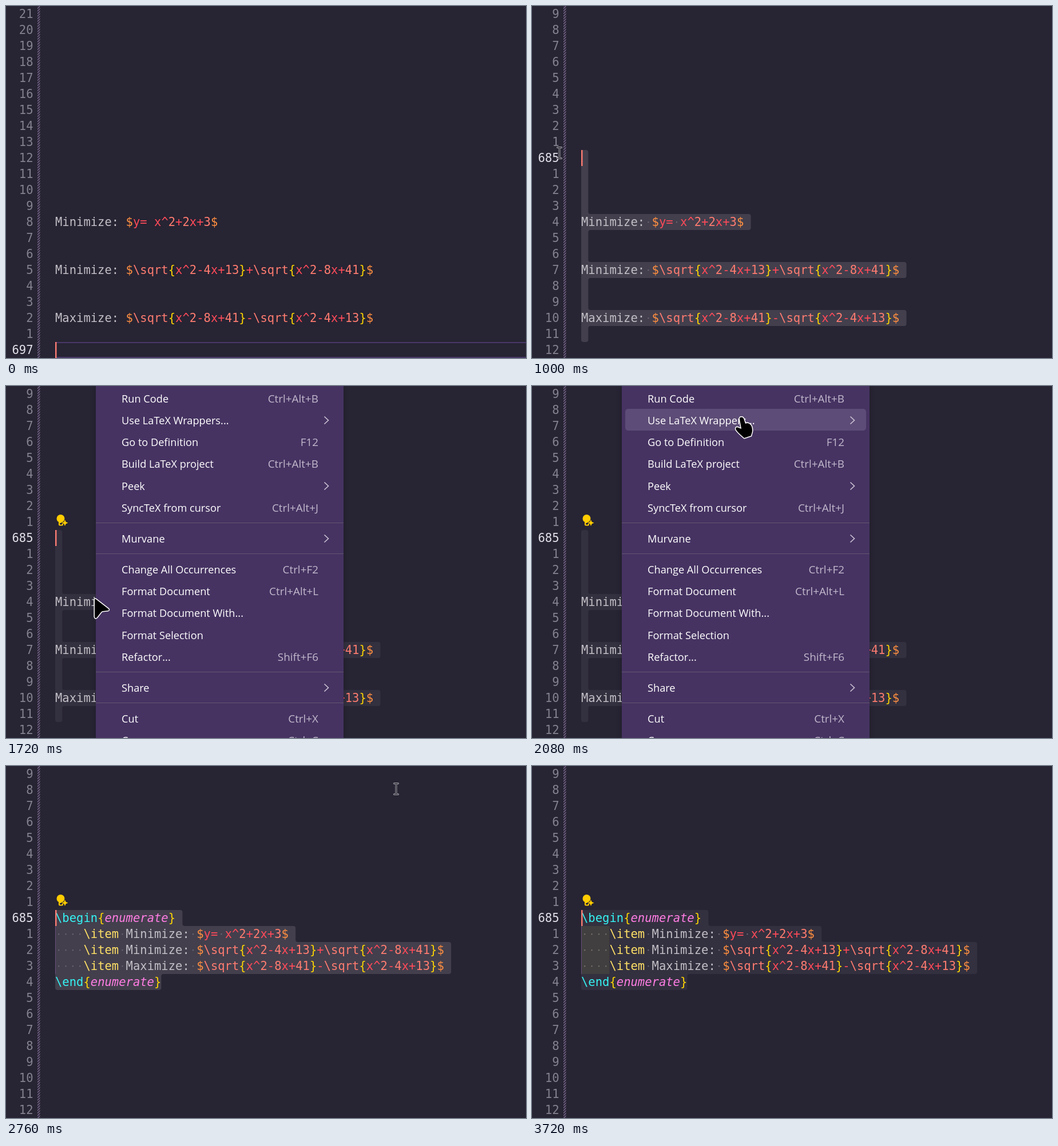
An HTML page with a canvas that plays this animation: 909x616 px, repeating every 3800 ms.

```html
<!DOCTYPE html>
<html lang="en">
<head>
<meta charset="utf-8">
<title>Wrapping lines in a list</title>
<style>
html, body { margin: 0; width: 100%; height: 100%; overflow: hidden; background: #272433; }
canvas { display: block; width: 909px; height: 616px; }
</style>
</head>
<body>
<canvas id="stage" width="909" height="616"></canvas>
<script>
const ctx = document.getElementById('stage').getContext('2d');
const W = 909, H = 616, LOOP = 3800, STEP = 40;
const ROW = 28, CHAR = 12.36, LEFT = 86;
const MONO = '20.53px "DejaVu Sans Mono", "Noto Sans Mono", monospace';
const UI = '18.2px "Open Sans", "Noto Sans", sans-serif';
const KEYS = '18.9px "Open Sans", "Noto Sans", sans-serif';
const MENU_AT = 1520, SUB_AT = 2320, WRAP_AT = 2760, SHADE_AT = 2880, BLUR_AT = 3720;

const sum = '$y= x^2+2x+3$';
const near = '\\sqrt{x^2-4x+13}', far = '\\sqrt{x^2-8x+41}';
const tasks = ['Minimize: ' + sum, `Minimize: $${near}+${far}$`, `Maximize: $${far}-${near}$`];
const before = { 13: tasks[0], 16: tasks[1], 19: tasks[2] };
const after = { 9: '\\begin{enumerate}', 13: '\\end{enumerate}' };
tasks.forEach((task, i) => after[10 + i] = '    \\item ' + task);

// label, centre y, shortcut ('>' opens a submenu)
const menu = [
  ['Run Code', 22, 'Ctrl+Alt+B'], ['Use LaTeX Wrappers...', 60, '>'],
  ['Go to Definition', 98.5, 'F12'], ['Build LaTeX project', 136.5, 'Ctrl+Alt+B'],
  ['Peek', 175, '>'], ['SyncTeX from cursor', 213, 'Ctrl+Alt+J'],
  ['Murvane', 267, '>'],
  ['Change All Occurrences', 321, 'Ctrl+F2'], ['Format Document', 359.5, 'Ctrl+Alt+L'],
  ['Format Document With...', 397.5, ''], ['Format Selection', 436, ''],
  ['Refactor...', 474, 'Shift+F6'], ['Share', 528, '>'],
  ['Cut', 582, 'Ctrl+X'], ['Copy', 620, 'Ctrl+C']
];
const submenu = [['Wrap by enumerate', 60], ['Wrap by itemize', 98.5], ['Unwrap Environment', 152.5]];

// time, x, y of the mouse
const path = [
  [40, 160, 640], [200, 171, 599], [400, 171, 599], [920, 56, 265], [1000, 56, 265],
  [1480, 154, 371], [1720, 155, 373], [2080, 366, 55], [2200, 366, 55],
  [2640, 690, 48], [3040, 690, 48], [3480, 610, 585]
];

const arrow = new Path2D('M0 0Q1 -1 2 0L24 17Q26 19.5 23 20L14 21Q12 21.5 11 23L4 32Q1 35 0 31Z');
const hand = new Path2D('M-3 3C-4 -1 2 -2 4 2L7 11C10 9 13 10 15 12C18 14 19 19 19 23' +
  'C19 27 17 29 17 32L5 36C1 32 -5 28 -9 22C-11 18 -8 16 -5 18L0 20Z');

const ease = p => p < .5 ? 4 * p ** 3 : 1 - (2 - 2 * p) ** 3 / 2;
const clamp = (v, lo, hi) => Math.max(lo, Math.min(hi, v));
const colX = col => LEFT + col * CHAR;

function mouseAt(t) {
  if (t <= path[0][0]) return { x: path[0][1], y: path[0][2] };
  const i = path.findIndex(k => k[0] >= t);
  if (i < 0) return { x: -99, y: -99 };
  const [t0, x0, y0] = path[i - 1], [t1, x1, y1] = path[i];
  const p = ease((t - t0) / (t1 - t0));
  return { x: x0 + (x1 - x0) * p, y: y0 + (y1 - y0) * p };
}

function rect(x, y, w, h, color, r = 0) {
  ctx.fillStyle = color;
  ctx.beginPath();
  ctx.roundRect(x, y, w, h, r);
  ctx.fill();
}

function label(text, x, y, color, align = 'left') {
  ctx.fillStyle = color;
  ctx.textAlign = align;
  ctx.fillText(text, x, y);
}

function drawGutter(caretRow) {
  ctx.font = MONO;
  for (let r = 0; r < 22; r++) {
    const active = r === caretRow;
    label(active ? 676 + r : Math.abs(r - caretRow), 47.5, r * ROW + 21,
      active ? '#e2e0e8' : '#858290', 'right');
  }
  ctx.save();
  ctx.beginPath();
  ctx.rect(55, 0, 4.5, H);
  ctx.clip();
  ctx.beginPath();
  for (let y = 0; y < H + 9; y += 4.5) {
    ctx.moveTo(54, y + 1);
    ctx.lineTo(61, y - 6);
  }
  ctx.strokeStyle = '#7d6a90';
  ctx.lineWidth = 1.5;
  ctx.stroke();
  ctx.restore();
}

function tokenColor(s) {
  if (/^\\(begin|end)/.test(s)) return '#35f3f3';
  if (s === '\\item') return '#ffe066';
  if (s === 'enumerate') return '#ff7de3';
  if (/^[{}]/.test(s)) return '#ffd602';
  if (s === '$') return '#ff8f40';
  if (/^[A-Z]/.test(s)) return '#c3bfc6';
  return /^[\\\d]/.test(s) ? '#ff7c70' : '#ff4a59';
}

function drawCode(text, row) {
  const y = row * ROW + 21;
  const tokens = /\\(?:begin|end|item|sqrt)|[A-Z]\w+:|enumerate|[{}]|\$|\d+|[xy^=+-]/g;
  for (const m of text.matchAll(tokens)) {
    ctx.font = (m[0] === 'enumerate' ? 'italic ' : '') + MONO;
    label(m[0], colX(m.index), y, tokenColor(m[0]));
  }
}

function roundedPolygon(points, color) {
  const n = points.length;
  const dist = (a, b) => Math.hypot(a[0] - b[0], a[1] - b[1]);
  ctx.beginPath();
  ctx.moveTo((points[0][0] + points[n - 1][0]) / 2, (points[0][1] + points[n - 1][1]) / 2);
  points.forEach((p, i) => {
    const prev = points[(i + n - 1) % n], next = points[(i + 1) % n];
    const r = Math.min(4, dist(p, prev) / 2, dist(p, next) / 2);
    ctx.arcTo(p[0], p[1], next[0], next[1], r);
  });
  ctx.closePath();
  ctx.fillStyle = color;
  ctx.fill();
}

function drawSelection(lines, first, last, col, lastBreak, color) {
  const points = [[colX(col), first * ROW]];
  for (let r = first; r <= last; r++) {
    const len = (lines[r] || '').length + (r < last || lastBreak ? 1 : 0);
    points.push([colX(len), r * ROW], [colX(len), (r + 1) * ROW]);
  }
  points.push([LEFT, (last + 1) * ROW]);
  if (col) points.push([LEFT, (first + 1) * ROW], [colX(col), (first + 1) * ROW]);
  roundedPolygon(points, color);

  for (let r = first; r <= last; r++) {
    [...(lines[r] || '')].forEach((ch, i) => {
      if (ch === ' ' && (r > first || i >= col))
        rect(colX(i + .5) - 1.2, r * ROW + 13, 2.4, 2.4, '#68636f', 1);
    });
  }
}

function drawBulb() {
  ctx.fillStyle = '#ffcc00';
  ctx.beginPath();
  ctx.arc(95.5, 232, 7, 0, 7);
  ctx.fill();
  rect(92, 237, 8, 7.5, '#ffcc00', 2);
  rect(94, 240, 4, 2.5, '#272433');
  const star = r => {
    ctx.beginPath();
    ctx.moveTo(103, 239.5 - r);
    for (let i = 1; i <= 8; i++) {
      const a = i * Math.PI / 4 - Math.PI / 2, d = i % 2 ? r * .42 : r;
      ctx.lineTo(103 + d * Math.cos(a), 239.5 + d * Math.sin(a));
    }
    ctx.fill();
  };
  ctx.fillStyle = '#272433';
  star(7.5);
  ctx.fillStyle = '#ffcc00';
  star(5.5);
}

function panel(x, y, w, h, r) {
  ctx.save();
  ctx.shadowColor = 'rgba(0,0,0,.2)';
  ctx.shadowBlur = 10;
  rect(x, y, w, h, '#463362', r);
  ctx.restore();
}

function drawMenu(t, mouse) {
  const rowBack = (x, y, w) => rect(x, y - 20, w, 38, '#5d4c77', 5);
  const line = (x, y, w) => rect(x, y, w, 1, '#64566f');
  const inside = mouse.x > 163 && mouse.x < 584;
  const hover = t >= 2080 ? 1 : inside ? menu.findIndex(m => Math.abs(m[1] - mouse.y) < 19) : -1;

  panel(157, -30, 433, 680, 0);
  [239, 293, 500, 554].forEach(y => line(157, y, 433));
  menu.forEach(([name, y, key], i) => {
    if (i === hover) rowBack(163, y, 421);
    ctx.font = UI;
    label(name, 202, y + 6.5, '#fff');
    if (key !== '>') {
      ctx.font = KEYS;
      return label(key, 546, y + 6.5, '#c2b9cd', 'right');
    }
    ctx.beginPath();
    ctx.moveTo(556.5, y - 6.5);
    ctx.lineTo(563.5, y);
    ctx.lineTo(556.5, y + 6.5);
    ctx.strokeStyle = '#cdc5d6';
    ctx.lineWidth = 1.6;
    ctx.stroke();
  });

  if (t < SUB_AT) return;
  panel(590, 35, 266, 142, 6);
  line(590, 125, 266);
  if (mouse.x > 592) rowBack(596, 60, 254);
  ctx.font = UI;
  submenu.forEach(([name, y]) => label(name, 635, y + 6.5, '#fff'));
}

function drawMouse(t, { x, y }) {
  ctx.save();
  ctx.lineJoin = ctx.lineCap = 'round';
  if (t < MENU_AT || t >= WRAP_AT) {
    ctx.translate(x - 8, y - 8);
    ctx.beginPath();
    ctx.moveTo(-3.5, -9.5);
    ctx.lineTo(3.5, -9.5);
    ctx.moveTo(0, -9.5);
    ctx.lineTo(0, 9.5);
    ctx.moveTo(-3.5, 9.5);
    ctx.lineTo(3.5, 9.5);
    for (const [color, width] of [['#aaa7b0', 3], ['#1c1a22', 1.2]]) {
      ctx.strokeStyle = color;
      ctx.lineWidth = width;
      ctx.stroke();
    }
  } else {
    const shape = x > 157 ? hand : arrow;
    ctx.translate(x, y);
    ctx.strokeStyle = '#fff';
    ctx.lineWidth = 3;
    ctx.stroke(shape);
    ctx.fillStyle = '#000';
    ctx.fill(shape);
  }
  ctx.restore();
}

function draw(t) {
  const mouse = mouseAt(t);
  const wrapped = t >= WRAP_AT, menuOpen = t >= MENU_AT && !wrapped;
  const lines = wrapped ? after : before;
  let caretRow = 21, caretCol = 0;
  if (t >= 920) caretRow = 9;
  else if (t >= 400) {
    caretRow = clamp(Math.floor(mouse.y / ROW), 9, 21);
    caretCol = clamp(Math.round((mouse.x - LEFT) / CHAR), 0, (lines[caretRow] || '').length);
  }

  rect(0, 0, W, H, '#272433');
  drawGutter(caretRow);
  if (caretRow === 21) {
    rect(LEFT, 588, W, 2, '#483868');
    rect(LEFT, 614, W, 2, '#483868');
  } else {
    const color = menuOpen || t >= BLUR_AT ? '#33303f' : '#433f4d';
    drawSelection(lines, caretRow, wrapped ? 13 : 20, caretCol, !wrapped, color);
  }
  if (wrapped) {
    if (t >= SHADE_AT) rect(LEFT, 10 * ROW, 4 * CHAR, 3 * ROW, 'rgba(255,255,64,.07)');
    rect(LEFT, 10 * ROW, 1, 3 * ROW, '#6b4f7c');
  }
  for (const r in lines) drawCode(lines[r], +r);

  const caretOff = (t >= 200 && t < 400) || (t >= 1800 && t < WRAP_AT) || (t >= 3040 && t < 3520);
  if (!caretOff) rect(colX(caretCol), caretRow * ROW, 2.5, ROW, '#f97b72');
  if (t >= 1200) drawBulb();
  if (menuOpen) drawMenu(t, mouse);
  drawMouse(t, mouse);
}

const start = performance.now();
function tick() {
  const t = (performance.now() - start) % LOOP;
  draw(Math.floor(t / STEP) * STEP);
  requestAnimationFrame(tick);
}
tick();
</script>
</body>
</html>
```
